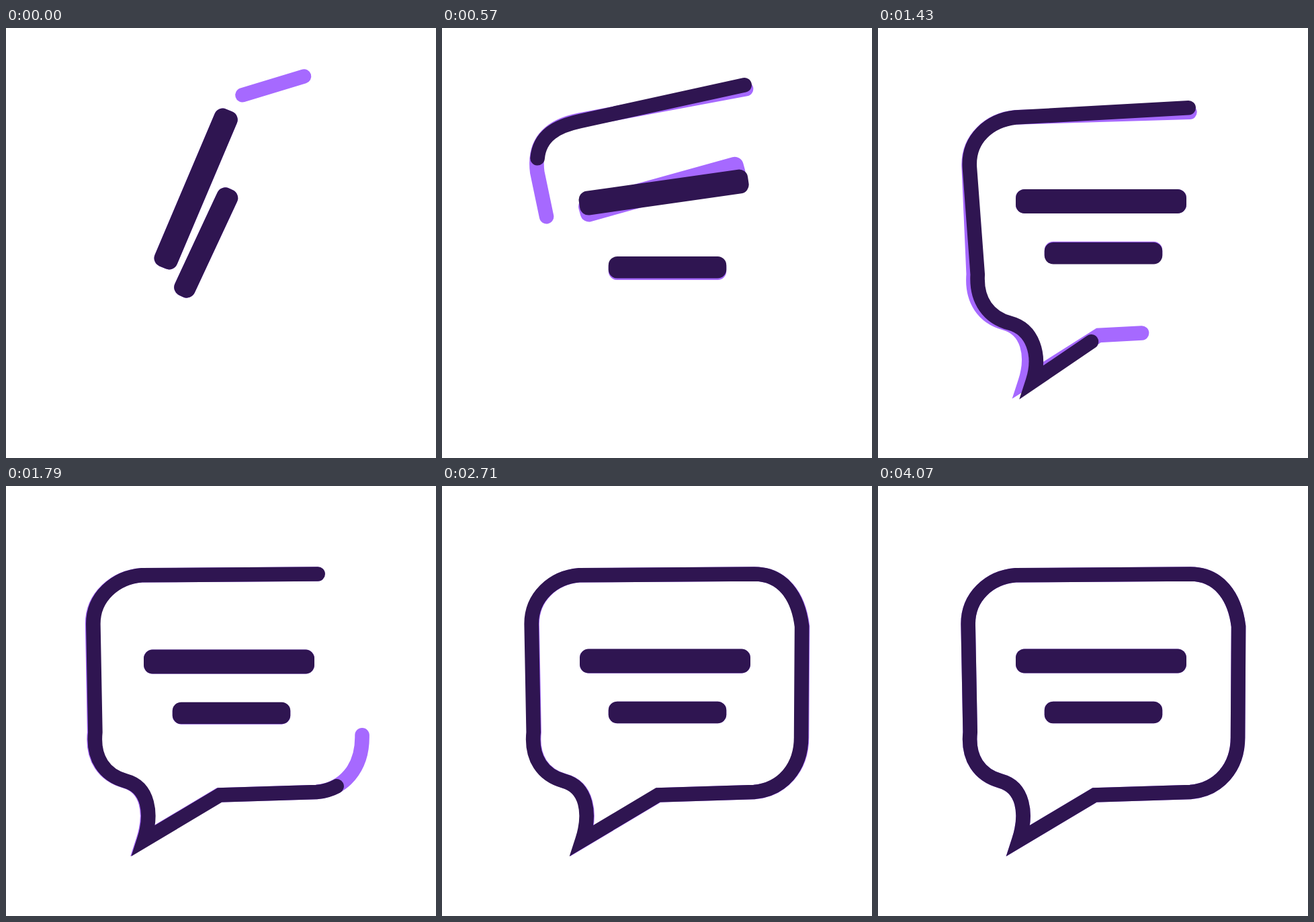
Animation, 640 px wide and 640 px high, one loop 5.93 s. Source, as an HTML page:

```html
<!DOCTYPE html>
<html lang="en">
<head>
<meta charset="utf-8">
<title>Speech bubble</title>
<style>
  html, body { margin: 0; width: 100%; height: 100%; overflow: hidden; background: #fff; }
  svg { display: block; width: 100%; height: 100%; }
  path { fill: none; stroke-width: 21.6; stroke-linecap: round; stroke-miterlimit: 10; }
  rect.light { fill: #a669ff; }
  rect.dark { fill: #2f1551; }
  path.light { stroke: #a669ff; }
  path.dark { stroke: #2f1551; }
</style>
</head>
<body>
<svg viewBox="0 0 640 640">
  <path class="light" pathLength="1"/>
  <path class="dark" pathLength="1"/>
  <rect class="light"/>
  <rect class="light"/>
  <rect class="dark"/>
  <rect class="dark"/>
</svg>
<script>
const LOOP = 5930;
const STEP = 1000 / 14;
const LINE_LAG = 156;
const BAR_LAG = 72;
const DRAW_TIME = 2415;
const MORPH_TIME = 1560;

const ramp = (t, from, to) => Math.min(1, Math.max(0, (t - from) / (to - from)));
const mix = (a, b, u) => a + (b - a) * u;

// Damped swing that starts when a movement reaches its goal.
function spring(t, kick) {
  return t <= 0 ? 0 : kick * Math.exp(-0.00225 * t) * Math.sin(Math.PI * t / 390);
}

const bars = [
  { w: 254, h: 36, x: 332, reach: 68, tilt: 67, flatAt: 650,
    fromY: 239.5, y: 260.5, start: 490, settle: 830, kick: 9.5, drop: 0 },
  { w: 175.5, h: 32.5, x: 335.5, reach: 52, tilt: 65, flatAt: 430,
    fromY: 376, y: 337, start: 0, settle: 1130, kick: -5.2, drop: 56.5 }
];

function bubble(t) {
  const u = ramp(t, 0, MORPH_TIME);
  const rest = 1 - u;
  const lean = 60 * rest;
  const sway = spring(t - MORPH_TIME, -9.5);
  const sag = 8 * (1 - ramp(t, 900, 1300));

  const S = [mix(443.5, 465, 1 - rest ** 1.2) + 0.2 * sway, mix(72, 131, u ** 1.15)];
  const A = [204.7 + 0.6 * sway, 132.8 + 11.7 * rest ** 2.2];
  const B = [134.2 + 0.2 * lean + sway, 207 + sag];
  const C = [137.2 + lean + sway, 366.5 + sag];
  const D = [182.3 + 1.25 * lean + sway, 439 + 0.3 * sag];
  const T = [209.8 + 1.85 * lean + sway, 527.2 - 0.1 * lean];
  const E = [322.5 + 1.2 * lean + sway, 460 - 0.5 * lean];
  const F = [465 + 2 * lean + 0.6 * sway, 455.5 - 1.2 * lean];
  const G = [535.6 + lean + sway, 373];
  const H = [536.6 + lean + sway, 209];

  const line = p => "L" + p;
  // Handles are given relative to the two end points.
  const curve = (p, px, py, q, qx, qy) =>
    `C${p[0] + px},${p[1] + py} ${q[0] + qx},${q[1] + qy} ${q}`;
  return "M" + S + line(A)
    + curve(A, -39, 3 + 0.1 * (A[1] - S[1]), B, -1 - 0.15 * lean, -42 - sag)
    + line(C)
    + curve(C, -4 + 0.15 * lean, 39, D, -31, -8.5)
    + curve(D, 34, 9, T, 13, -40)
    + line(E) + line(F)
    + curve(F, 41, -3.5, G, 0.4, 47)
    + line(H)
    + curve(H, -5.5, -45, S, 42, 0) + "Z";
}

function drawLine(path, t) {
  const part = (t + LINE_LAG) / DRAW_TIME;
  path.style.display = part > 0 ? "" : "none";
  path.setAttribute("d", bubble(t));
  path.setAttribute("stroke-dasharray", part < 1 ? part + " 2" : "none");
}

function drawBar(rect, bar, t) {
  const angle = bar.tilt * (1 - ramp(t, 0, bar.flatAt));
  const rad = angle * Math.PI / 180;
  const x = bar.x - bar.reach * (1 - Math.cos(rad)) - 8.6 * Math.sin(rad);
  const y = mix(bar.fromY, bar.y, ramp(t, bar.start, bar.settle))
    + spring(t - bar.settle, bar.kick)
    - bar.drop * (1 - ramp(t, 0, 220)) ** 2;
  rect.setAttribute("transform", `translate(${x} ${y}) rotate(${-angle})`);
}

const [lightLine, darkLine] = document.querySelectorAll("path");
const rects = [...document.querySelectorAll("rect")];
rects.forEach((rect, i) => {
  const { w, h } = bars[i % 2];
  const size = { x: -w / 2, y: -h / 2, width: w, height: h, rx: 13 };
  for (const name in size) rect.setAttribute(name, size[name]);
});

function render(time) {
  const t = Math.floor((time % LOOP + 5) / STEP) * STEP;
  drawLine(lightLine, t);
  drawLine(darkLine, t - LINE_LAG);
  rects.forEach((rect, i) => drawBar(rect, bars[i % 2], i < 2 ? t - BAR_LAG : t));
}

const begin = performance.now();
function tick() {
  render(performance.now() - begin);
  requestAnimationFrame(tick);
}
tick();
</script>
</body>
</html>
```
